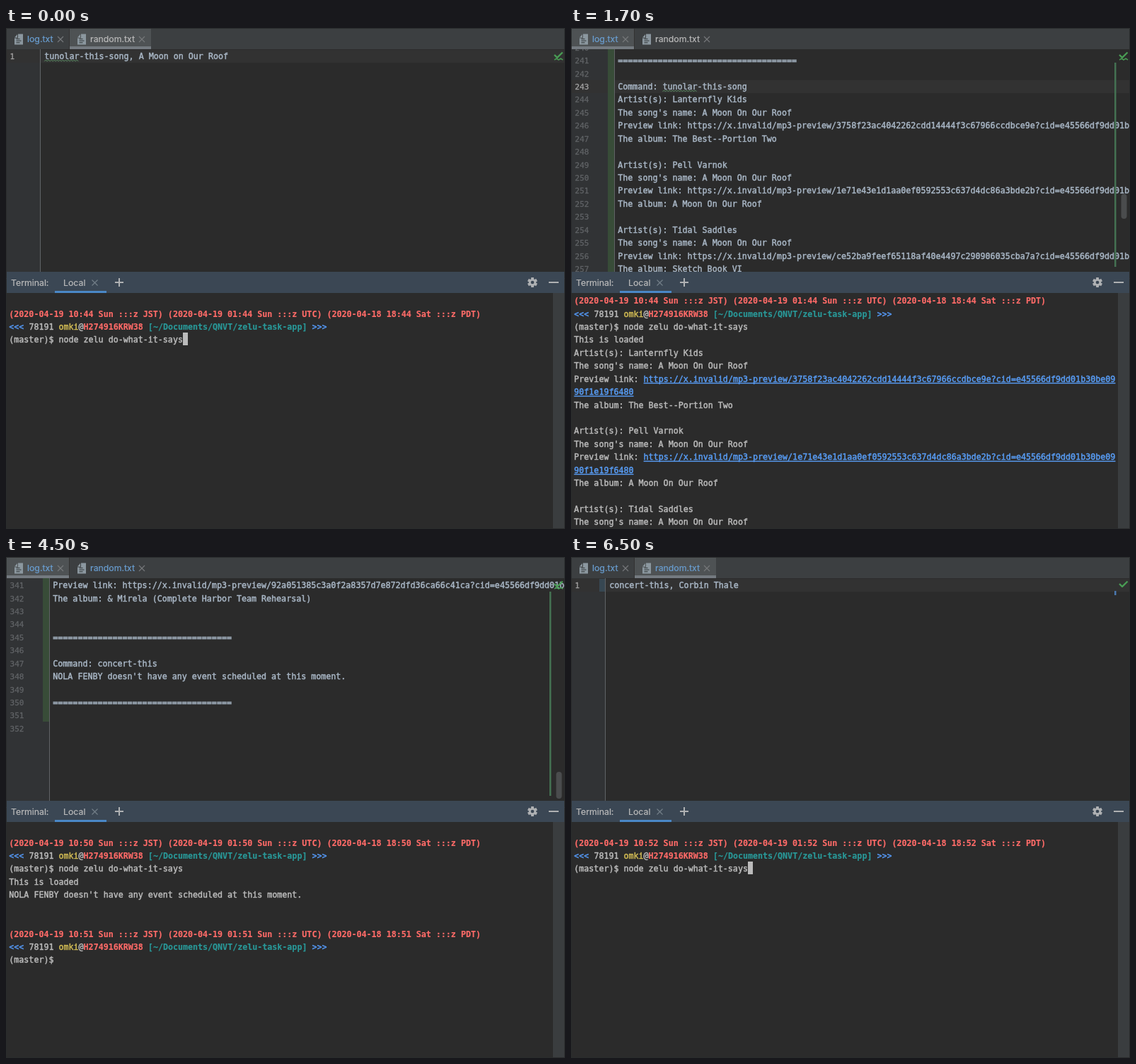
An HTML page with a canvas for the animation above (8000 ms loop, 790x709 px).

```html
<!DOCTYPE html>
<html lang="en">
<head>
<meta charset="utf-8">
<title>Editor and terminal</title>
<style>
html, body { margin: 0; width: 100%; height: 100%; overflow: hidden; background: #2b2b2b; }
canvas { display: block; }
</style>
</head>
<body>
<canvas id="stage" width="790" height="709"></canvas>
<script>
const ctx = document.getElementById('stage').getContext('2d');
const W = 790, H = 709, ROW = 18.42, CH = 7.02, LOOP = 8000;
const MONO = '11.66px "DejaVu Sans Mono", monospace';
const UI = '12.3px Inter, sans-serif';
const C = {
  bar: '#3c3f41', tab: '#4e5254', tabLine: '#747a80', edge: '#323232', bg: '#2b2b2b',
  gutter: '#313335', rule: '#606366', code: '#a9b7c6', num: '#606366', added: '#384c38',
  changed: '#374752', head: '#3b4754', accent: '#4a88c7', text: '#bbbbbb', icon: '#afb1b3',
  red: '#ff6b68', blue: '#5394ec', yellow: '#d6bf55', teal: '#299999', link: '#589df6',
  green: '#499c54', name: '#6a9fd2', thumb: '#4a4c4d'
};

// ---- content ----
function hex(seed, n) {
  let s = '';
  for (let i = 0; i < n; i++) {
    seed = (seed * 16807 + 11) % 2147483647;
    s += (seed >> 8 & 15).toString(16);
  }
  return s;
}
const link = seed => `https://x.invalid/mp3-preview/${hex(seed, 40)}?cid=${hex(977, 32)}`;
const RULE = '='.repeat(36);
const SONG = 'A Moon On Our Roof';
const songs = [
  ['Lanternfly Kids', 4127, 'The Best--Portion Two'],
  ['Pell Varnok', 8861, SONG],
  ['Tidal Saddles', 3319, 'Sketch Book VI']
].map(([artist, seed, album]) => [
  'Artist(s): ' + artist, "The song's name: " + SONG,
  'Preview link: ' + link(seed), 'The album: ' + album, ''
]).flat();

const NOTICE = "NOLA FENBY doesn't have any event scheduled at this moment.";
const songLog = ['', RULE, '', 'Command: tunolar-this-song', ...songs];
const eventLog = [
  'Preview link: ' + link(6203), 'The album: & Mirela (Complete Harbor Team Rehearsal)',
  '', '', RULE, '', 'Command: concert-this', NOTICE, '', RULE, '', ''
];

const plain = s => [[s, C.text]];
const prompt = min => [
  [[`(2020-04-19 10:${min} Sun :::z JST) (2020-04-19 01:${min} Sun :::z UTC) ` +
    `(2020-04-18 18:${min} Sat :::z PDT)`, C.red, 1]],
  [['<<< ', C.blue, 1], ['78191 ', C.text], ['omki', C.yellow], ['@', C.text],
   ['H274916KRW38', C.red, 1], [' [~/Documents/QNVT/zelu-task-app]', C.teal, 1], [' >>>', C.blue, 1]]
];
const COMMAND = '(master)$ node zelu do-what-it-says';
const waiting = min => [[], ...prompt(min), plain(COMMAND)];

// Long links wrap at the terminal's 109 columns.
const wrapped = songs.flatMap(s => {
  if (!s.startsWith('Preview')) return [plain(s)];
  return [[...plain(s.slice(0, 14)), [s.slice(14, 109), C.link, 0, 1]], [[s.slice(109), C.link, 0, 1]]];
});

const scenes = [
  { end: 500, tab: 1, names: [1, 0], lines: ['tunolar-this-song, A Moon on Our Roof'],
    typo: [0, 0], term: waiting(44), cursor: 1 },
  { end: 2500, tab: 0, names: [1, 0], lines: songLog, first: 240, top: 27.6, caret: 3,
    typo: [3, 9], added: 345, thumb: [235, 270],
    term: [...prompt(44), plain(COMMAND), plain('This is loaded'), ...wrapped].slice(0, 18) },
  { end: 4500, tab: 1, names: [1, 1], lines: ['concert-this, Nola Fenby'], edited: 1,
    term: waiting(50), cursor: 1 },
  { end: 6500, tab: 0, names: [1, 1], lines: eventLog, first: 341, top: 40, caret: -1,
    wavy: 1, added: 233, thumb: [304, 342],
    term: [...waiting(50), plain('This is loaded'), plain(NOTICE), [], [], ...prompt(51), plain('(master)$')] },
  { end: 8000, tab: 1, names: [1, 1], lines: ['concert-this, Corbin Thale'], edited: 1,
    term: waiting(52), cursor: 1 }
];

// ---- drawing helpers ----
function box(x, y, w, h, color) {
  ctx.fillStyle = color;
  ctx.fillRect(x, y, w, h);
}
function text(s, x, y, color, font = MONO, weight = 0) {
  ctx.font = font;
  ctx.fillStyle = ctx.strokeStyle = color;
  ctx.fillText(s, x, y);
  if (!weight) return;
  ctx.lineWidth = weight;
  ctx.lineJoin = 'round';
  ctx.strokeText(s, x, y);
}
function path(points, color, width) {
  ctx.beginPath();
  points.forEach(([x, y]) => ctx.lineTo(x, y));
  ctx.strokeStyle = color;
  ctx.lineWidth = width;
  ctx.stroke();
}
function cross(x, y, r, color) {
  path([[x - r, y - r], [x + r, y + r]], color, 1.1);
  path([[x - r, y + r], [x + r, y - r]], color, 1.1);
}
function wave(x, y, w, color, step = 2, width = 1) {
  const pts = [];
  for (let i = 0; i * step <= w; i++) pts.push([x + i * step, y + (i % 2 ? -1 : 1)]);
  path(pts, color, width);
}
function clip(x, y, w, h, draw) {
  ctx.save();
  ctx.beginPath();
  ctx.rect(x, y, w, h);
  ctx.clip();
  draw();
  ctx.restore();
}

function fileIcon(x, y) {
  ctx.fillStyle = '#8b979f';
  ctx.beginPath();
  [[5, 0], [12, 0], [12, 15], [0, 15], [0, 6], [5, 6]].forEach(([a, b]) => ctx.lineTo(x + a, y + b));
  ctx.fill();
  ctx.beginPath();
  [[4, 0.5], [4, 5], [0, 5]].forEach(([a, b]) => ctx.lineTo(x + a, y + b));
  ctx.fill();
  [5, 7, 5].forEach((w, i) => box(x + 2.5, y + 6.4 + i * 2.6, w, 1.2, '#3f4548'));
}

function gear(x, y) {
  ctx.fillStyle = C.icon;
  ctx.beginPath();
  ctx.arc(x, y, 5.2, 0, 7);
  ctx.fill();
  for (let i = 0; i < 6; i++) {
    ctx.save();
    ctx.translate(x, y);
    ctx.rotate(i * Math.PI / 3);
    ctx.fillRect(-1.9, -7, 3.8, 4);
    ctx.restore();
  }
  ctx.fillStyle = C.head;
  ctx.beginPath();
  ctx.arc(x, y, 2.3, 0, 7);
  ctx.fill();
}

// ---- panels ----
function tabs(s) {
  box(0, 0, W, 30, C.bar);
  [['log.txt', 1, 89, 12, 77], ['random.txt', 90, 115, 101, 192]].forEach(([name, x, w, icon, close], i) => {
    if (s.tab === i) {
      box(x, 1, w, 29, C.tab);
      box(x, 26, w, 4, C.tabLine);
    }
    fileIcon(icon, 8.5);
    text(name, icon + 18, 20, s.names[i] ? C.name : C.text, UI, 0.2);
    cross(close, 16, 4, '#76797b');
  });
  box(89, 1, 1, 29, C.edge);
}

function editor(s) {
  const log = s.tab === 0, edge = log ? 61 : 48, left = log ? 66.3 : 54.3, top = s.top || 40;
  const caret = s.caret ?? 0;
  box(0, 30, W, 315, C.bg);
  box(0, 30, edge, 315, C.gutter);
  if (caret >= 0) box(0, top + caret * ROW - 9.2, W, ROW, C.edge);
  if (s.added) box(52, 30, 9, s.added - 30, C.added);
  if (s.edited) box(40, 31, 8, 18, C.changed);
  box(edge, 30, 1, 315, C.rule);
  s.lines.forEach((line, i) => {
    const y = top + i * ROW + 4.2;
    text((s.first || 1) + i, 5.6, y, i === caret ? '#a4a3a3' : C.num, MONO.replace('11.66', '11'), 0.3);
    text(line, left, y, C.code, MONO, 0.45);
  });
  if (s.typo) wave(left + s.typo[1] * CH, top + s.typo[0] * ROW + 6.2, 7 * CH, '#5f9468');
  if (s.thumb) {
    ctx.fillStyle = C.thumb;
    ctx.beginPath();
    ctx.roundRect(777.5, s.thumb[0], 8, s.thumb[1] - s.thumb[0], 4);
    ctx.fill();
    box(768, 49, 2.5, 289, '#447152');
  }
  if (s.edited) box(768, 48, 2.5, 6, '#4a78b0');
  path([[775, 38], [779, 41.8], [786.5, 34.5]], C.green, 2.4);
  if (s.typo || s.wavy) wave(775, 44.2, 12, C.green, 3, 1.5);
}

function terminal(s) {
  box(0, 345, W, 30, C.head);
  text('Terminal:', 7, 365, C.text, UI, 0.2);
  text('Local', 81, 365, C.text, UI, 0.2);
  cross(125.5, 360.5, 4, '#74808a');
  box(69, 372, 73, 3, C.accent);
  box(154, 359, 12, 2, C.icon);
  box(159, 354, 2, 12, C.icon);
  gear(744, 360);
  box(767, 359, 14, 2, C.icon);

  box(0, 375, W, 334, C.bg);
  box(773, 375, 16, 334, '#3a3d3f');
  s.term.forEach((row, i) => {
    const y = 390.2 + i * ROW;
    let x = 4.3;
    row.forEach(([str, color, bold, under]) => {
      text(str, x, y, color, (bold ? 'bold ' : '') + MONO, bold ? 0.15 : 0.45);
      if (under) box(x, y + 1.2, str.length * CH, 1.4, color);
      x += str.length * CH;
    });
    if (s.cursor && i === s.term.length - 1) box(250, 431, 7, 18, C.text);
  });
}

function frame(now) {
  const t = now % LOOP, s = scenes.find(sc => t < sc.end);
  tabs(s);
  clip(0, 30, W, 315, () => editor(s));
  clip(0, 345, W, 364, () => terminal(s));
  ctx.strokeStyle = '#2a2c2d';
  ctx.lineWidth = 1;
  ctx.strokeRect(0.5, 0.5, W - 1, H - 1);
}

const start = performance.now();
function tick() {
  frame(performance.now() - start);
  requestAnimationFrame(tick);
}
tick();
</script>
</body>
</html>
```
